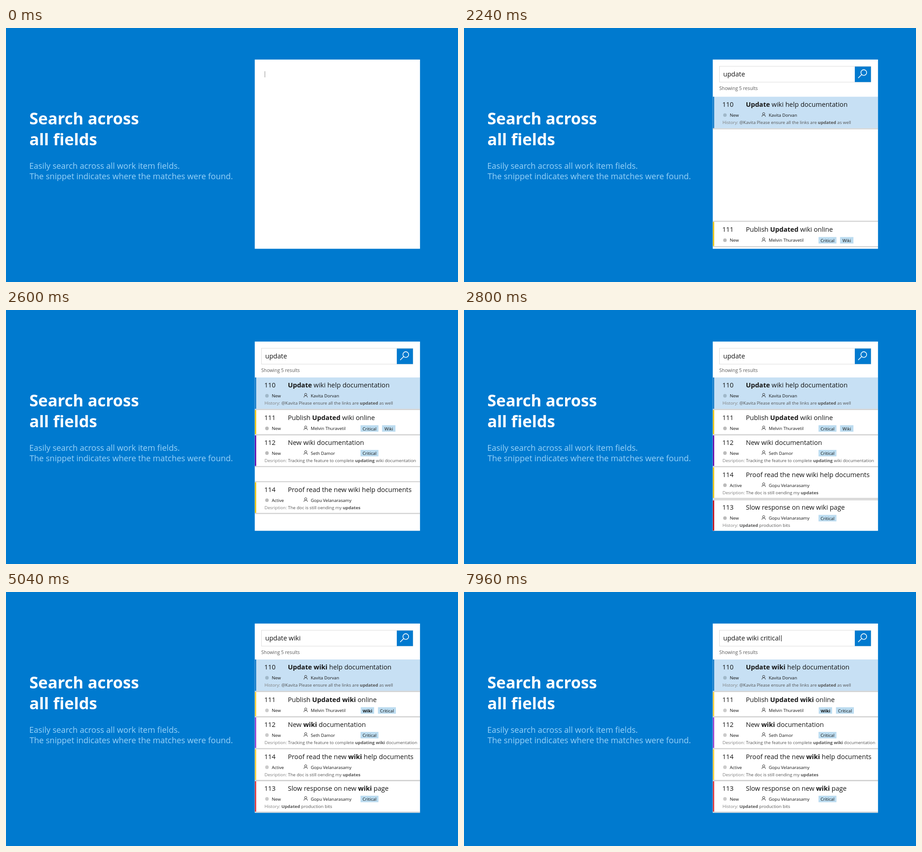
Write an HTML page with a canvas that moves like this. It is 997 px wide and 561 px high and loops after 8000 ms.

```html
<!DOCTYPE html>
<html lang="en">
<head>
<meta charset="utf-8">
<title>Search across all fields</title>
<style>
  html, body { margin: 0; width: 100%; height: 100%; overflow: hidden; background: #007acf; }
  canvas { display: block; }
</style>
</head>
<body>
<canvas id="stage" width="997" height="561"></canvas>
<script>
const ctx = document.getElementById('stage').getContext('2d');
const LOOP = 8000;
const BLUE = '#007acf';
const PANEL = { x: 548.7, y: 69.7, w: 364.5, h: 417.9 };
const QUERY = 'update wiki critical';
const KEY_MS = 160;
const TITLE_PX = 14.55, META_PX = 9.63;
const INK = '#141414';

// Asterisks toggle bold; `after` holds what changes once the query has grown.
const rows = [
  { id: 110, top: 149, base: 171, bottom: 218.5, bar: ['#1b7fc9', '#1b7fc9'], fill: '#c7e0f4',
    status: 'New', owner: 'Kavita Dorvan', title: '*Update* wiki help documentation',
    label: 'History: ', note: '@Kavita Please ensure all the links are *updated* as well', tags: [],
    after: { title: '*Update wiki* help documentation' } },
  { id: 111, top: 221, base: 243, bottom: 274.5, bar: ['#e9c415', '#f7cf3a'],
    status: 'New', owner: 'Melvin Thuravetil', title: 'Publish *Updated* wiki online',
    tags: [['Critical', 782, 39.5], ['Wiki', 829.5, 29.5]],
    after: { title: 'Publish *Updated wiki* online',
             tags: [['*Wiki*', 782.5, 29.5], ['Critical', 820.5, 39.5]] } },
  { id: 112, top: 277, base: 297.5, bottom: 344.5, bar: ['#640fae', '#9a45cf'],
    status: 'New', owner: 'Seth Damor', title: 'New wiki documentation',
    label: 'Desription: ', note: 'Tracking the feature to complete *updating* wiki documentation',
    tags: [['Critical', 782, 39.5]],
    after: { title: 'New *wiki* documentation',
             note: 'Tracking the feature to complete *updating wiki* documentation' } },
  { id: 114, top: 347.5, base: 368.5, bottom: 415, bar: ['#e9c415', '#f7cf3a'],
    status: 'Active', owner: 'Gopu Velanarasamy', title: 'Proof read the new wiki help documents',
    label: 'Desription: ', note: 'The doc is still oending my *updates*', tags: [],
    after: { title: 'Proof read the new *wiki* help documents' } },
  { id: 113, top: 418, base: 438.5, bottom: 485, bar: ['#c3121f', '#e03a40'],
    status: 'New', owner: 'Gopu Velanarasamy', title: 'Slow response on new wiki page',
    label: 'History: ', note: '*Updated* production bits', tags: [['Critical', 782, 39.5]],
    after: { title: 'Slow response on new *wiki* page' } }
];

const clamp = (v, lo = 0, hi = 1) => Math.min(hi, Math.max(lo, v));
const ramp = (t, from, to) => clamp((t - from) / (to - from));
const easeInOut = u => u < 0.5 ? 4 * u ** 3 : 1 - (2 - 2 * u) ** 3 / 2;

function box(x, y, w, h, color) {
  ctx.fillStyle = color;
  ctx.fillRect(x, y, w, h);
}

function dot(x, y, r, color) {
  ctx.fillStyle = color;
  ctx.beginPath();
  ctx.arc(x, y, r, 0, 2 * Math.PI);
  ctx.fill();
}

function setFont(px, bold) {
  ctx.font = `${bold ? 700 : 400} ${px}px "Open Sans", "Noto Sans", sans-serif`;
}

function richWidth(str, px) {
  return str.split('*').reduce((sum, part, i) => {
    setFont(px, i % 2);
    return sum + ctx.measureText(part).width;
  }, 0);
}

// Draws text with *bold* parts and returns the end x.
function rich(str, x, y, px, color) {
  ctx.fillStyle = color;
  str.split('*').forEach((part, i) => {
    setFont(px, i % 2);
    ctx.fillText(part, x, y);
    x += ctx.measureText(part).width;
  });
  return x;
}

function withAlpha(alpha, draw) {
  if (alpha <= 0) return;
  ctx.save();
  ctx.globalAlpha *= alpha;
  draw();
  ctx.restore();
}

function drawHeading() {
  rich('*Search across*', 51.4, 213, 35.7, '#fff');
  rich('*all fields*', 51.4, 259, 35.7, '#fff');
  rich('Easily search across all work item fields.', 51.3, 311, 18, '#98d3f9');
  rich('The snippet indicates where the matches were found.', 52, 333.8, 18, '#98d3f9');
}

function drawSearchBox() {
  ctx.strokeStyle = '#dcdcdc';
  ctx.lineWidth = 1;
  ctx.strokeRect(563.5, 84.5, 334, 35);
  box(862, 85.2, 35.6, 34.2, BLUE);
  ctx.strokeStyle = '#fff';
  ctx.lineWidth = 1.6;
  ctx.beginPath();
  ctx.arc(881.8, 98.4, 6.3, 0, 2 * Math.PI);
  ctx.moveTo(877.2, 102.8);
  ctx.lineTo(869.5, 110.5);
  ctx.stroke();
}

function typedCount(t) {
  const keys = (start, max) => clamp(Math.floor((t - start) / KEY_MS) + 1, 0, max);
  return keys(65, 6) + keys(3665, 5) + keys(6585, 9);
}

function drawQuery(t) {
  const text = QUERY.slice(0, typedCount(t));
  const end = rich(text, 571.7, 106.5, TITLE_PX, INK);
  const shown = t < 2000 ? 1 - ramp(t, 960, 1080)
    : t < 5000 ? ramp(t, 3260, 3520) * (1 - ramp(t, 4340, 4440))
    : ramp(t, 6180, 6360);
  const blink = 0.7 - 0.25 * Math.cos(2 * Math.PI * t / 640);
  const x = text ? end + 1.8 : 570.5;
  withAlpha(shown * blink, () => box(x, 95.5, 1.1, 13.5, '#111'));
}

function drawSpinner(t) {
  const head = (160 + (t - 1640) * 0.36) * Math.PI / 180;
  for (let k = 0; k < 8; k++) {
    const a = head - k * Math.PI / 4;
    withAlpha(0.85 * (1 - k / 8) + 0.04, () =>
      dot(728.9 + 7.2 * Math.cos(a), 245.5 + 7.2 * Math.sin(a), 1.8 - k * 0.07, '#222'));
  }
}

function drawPerson(x, y) {
  ctx.strokeStyle = '#333';
  ctx.lineWidth = 1;
  ctx.beginPath();
  ctx.arc(x, y - 2.6, 2.5, 0, 2 * Math.PI);
  ctx.moveTo(x - 4, y + 4);
  ctx.arc(x, y + 4, 4, Math.PI, 2 * Math.PI);
  ctx.stroke();
}

function drawRow(row, late) {
  const r = late ? { ...row, ...row.after } : row;
  const { top, base, bottom } = r;
  const height = bottom - top;
  if (r.id !== 110) box(PANEL.x, top - 2.5, PANEL.w, 2.5, '#d3d3d3');
  box(PANEL.x, bottom, PANEL.w, 2.5, '#d3d3d3');
  box(PANEL.x, top, PANEL.w, height, r.fill || '#fff');
  box(PANEL.x, top, 3.2, height, r.bar[late ? 1 : 0]);

  rich(String(r.id), 569.7, base, TITLE_PX, INK);
  rich(r.title, 621.7, base, TITLE_PX, INK);

  dot(575.6, base + 18.5, 3.9, r.fill ? '#a0b8c9' : late ? '#cbcbcb' : '#bbb');
  rich(r.status, 586.2, base + 22, META_PX, INK);
  drawPerson(661, base + 18.2);
  rich(r.owner, 672.2, base + 22, META_PX, INK);
  for (const [name, x, w] of r.tags) {
    box(x, base + 11.5, w, 14.3, '#bcdcf0');
    rich(name, x + (w - richWidth(name, META_PX)) / 2, base + 22.6, META_PX, INK);
  }
  if (r.note) {
    const x = rich(r.label, 570.2, base + 38, META_PX, '#7e7e7e');
    rich(r.note, x, base + 38, META_PX, '#525252');
  }
}

function drawResults(t) {
  withAlpha(ramp(t, 1700, 1860), () =>
    rich('Showing 5 results', 563, 137.3, 10.45, '#5a5a5a'));
  const swap = ramp(t, 4480, 5040);
  rows.forEach((row, i) => {
    const start = 1979 + 146 * i;
    if (t < start) return;
    const left = 1 - easeInOut(ramp(t, start, start + 300));
    ctx.save();
    ctx.translate(0, left * (490.5 - row.top));
    if (swap < 1) drawRow(row, false);
    withAlpha(swap, () => drawRow(row, true));
    ctx.restore();
  });
}

function render(t) {
  box(0, 0, 997, 561, BLUE);
  drawHeading();
  box(PANEL.x, PANEL.y, PANEL.w, PANEL.h, '#fff');
  ctx.save();
  ctx.beginPath();
  ctx.rect(PANEL.x, PANEL.y, PANEL.w, PANEL.h);
  ctx.clip();
  withAlpha(ramp(t, 20, 220), drawSearchBox);
  drawQuery(t);
  if (t >= 1020 && t < 1705) drawSpinner(t);
  if (t >= 1705) drawResults(t);
  ctx.restore();
}

const begin = performance.now();
function tick() {
  render((performance.now() - begin) % LOOP);
  requestAnimationFrame(tick);
}
tick();
</script>
</body>
</html>
```
